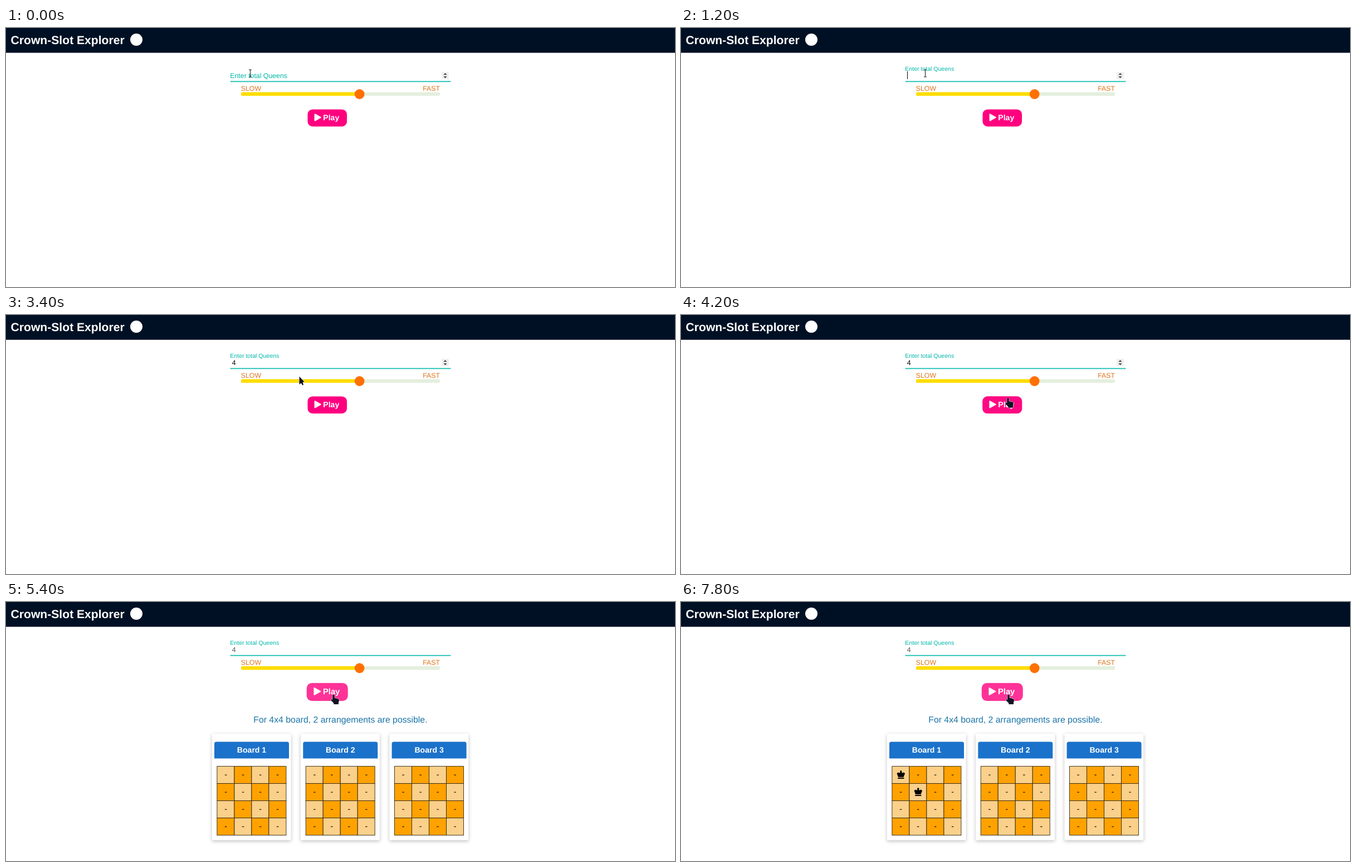
An HTML page for the animation above (8000 ms loop, 1201 by 466 pixels).

```html
<!DOCTYPE html>
<html lang="en">
<head>
<meta charset="utf-8">
<title>Crown-Slot Explorer</title>
<style>
  html, body { margin: 0; width: 100%; height: 100%; overflow: hidden; background: #fff; }
  svg { display: block; width: 100vw; height: 100vh; }
  text { font-family: "Liberation Sans", Arial, sans-serif; text-rendering: geometricPrecision; }
  .bold { font-weight: bold; fill: #fff; }
  .mid { text-anchor: middle; }
  .speed { font-size: 12.32px; fill: #e0741a; }
  .pointer { fill: #0e1424; stroke: #fff; stroke-width: 1; paint-order: stroke; }
  .card { fill: #fff; filter: drop-shadow(0 2px 3px rgba(0, 0, 0, .25)); }
</style>
</head>
<body>
<svg viewBox="0 0 1201 466">
  <defs>
    <path id="queen" d="M0-8.2a1.6 1.6 0 0 1 1.2 2.7L2.4-3.4 4.4-4.8 7.3-3.2 4.8 3.7H-4.8L-7.3-3.2-4.4-4.8-2.4-3.4-1.2-5.5A1.6 1.6 0 0 1 0-8.2ZM-5 4.6H5a.6.6 0 0 1 .6.6V6.6H-5.6V5.2a.6.6 0 0 1 .6-.6Z"/>
  </defs>

  <rect width="1201" height="44.6" fill="#001024"/>
  <text class="bold" x="8.6" y="28.6" font-size="21.12">Crown-Slot Explorer</text>
  <circle cx="234" cy="21" r="11" fill="#fff"/>

  <text id="label" x="402.3" fill="#00b8a9">Enter total Queens</text>
  <text id="value" x="405.7" y="90" font-size="12.32">4</text>
  <rect id="caret" y="78" width="1" height="14"/>
  <g id="spinner">
    <rect x="782" y="79" width="13" height="13.5" fill="#efefef"/>
    <path d="M785.3 84.2 788.5 81 791.7 84.2ZM785.3 87 788.5 90.2 791.7 87Z" fill="#444"/>
  </g>
  <rect x="402.5" y="95.4" width="396" height="1.8" fill="#1bbfb1"/>

  <text class="speed" x="421.8" y="112.6">SLOW</text>
  <text class="speed" x="779" y="112.6" text-anchor="end">FAST</text>
  <rect x="422" y="115.5" width="357" height="6.5" rx="2.6" fill="#e4efdd"/>
  <rect x="422" y="115.5" width="214" height="6.5" rx="2.6" fill="#ffdd00"/>
  <circle cx="634.7" cy="119" r="8.9" fill="#ff7000"/>

  <g id="play">
    <rect id="face" x="541.5" y="146.5" width="70.5" height="30.7" rx="8.8"/>
    <path d="M554.6 155.2V166.6L564.8 160.9Z" fill="#fff" stroke="#fff" stroke-width="2" stroke-linejoin="round"/>
    <text class="bold" x="569.3" y="166" font-size="14.08">Play</text>
  </g>

  <g id="result">
    <text class="mid" x="600.4" y="217.4" font-size="15.84" fill="#1c74a8">For 4x4 board, 2 arrangements are possible.</text>
    <g id="boards"></g>
  </g>

  <path id="beam" d="M-2.5-6.5H-.8Q0-6.5 0-5.7Q0-6.5.8-6.5H2.5M0-5.7V5.7M-2.5 6.5H-.8Q0 6.5 0 5.7Q0 6.5.8 6.5H2.5" fill="none" stroke="#222" stroke-width="1.1"/>
  <path id="arrow" class="pointer" d="M0 0V14.5L3.2 12 5.8 16 7.6 14.8 6 10.6 9 9.8Z"/>
  <path id="hand" class="pointer" d="M-1.8 1.5Q0-1 1.8 1.5V6.3L8 7.6Q10 8.4 10 10.6L9 14.6V17.8H.3V15.6L-4.3 11Q-5.3 9-3.3 8.4L-1.8 9.6Z"/>
</svg>
<script>
const $ = id => document.getElementById(id);
const LIGHT = '#fad08a', DARK = '#ffa200', CLASH = '#fb5607';
const LOOP = 8000, CELL = 31;

function cell(board, row, col) {
  const x = 378.9 + board * 159.3 + col * CELL, y = 295.6 + row * CELL;
  const id = `${board}${row}${col}`;
  return `<rect id="bg${id}" x="${x}" y="${y}" width="${CELL}" height="${CELL}"
      fill="${(row + col) % 2 ? DARK : LIGHT}" stroke="#33260f" stroke-width=".9"/>
    <text id="dash${id}" class="mid" x="${x + 15.6}" y="${y + 19.6}" font-size="14.08">-</text>
    <use id="queen${id}" href="#queen" x="${x + 15.9}" y="${y + 15.8}" visibility="hidden"/>`;
}

function board(n) {
  const x = n * 159.3;
  let cells = '';
  for (let i = 0; i < 16; i++) cells += cell(n, i >> 2, i & 3);
  return `<rect class="card" x="${369.8 + x}" y="237" width="141.8" height="191.4" rx="2"/>
    <path d="M${374 + x} 281.4V255q0-3.5 3.5-3.5h127q3.5 0 3.5 3.5V281.4Z" fill="#1b72ca"/>
    <text class="bold mid" x="${441 + x}" y="271" font-size="14.08">Board ${n + 1}</text>${cells}`;
}
$('boards').innerHTML = [0, 1, 2].map(board).join('');

const clamp = v => Math.min(1, Math.max(0, v));
const ease = v => v * v * (3 - 2 * v);
const mix = (a, b, p) => a + (b - a) * p;
const within = (t, ...spans) => spans.some(([a, b]) => t >= a && t < b);
const show = (id, on) => $(id).setAttribute('visibility', on ? 'visible' : 'hidden');

// time, x, y of the pointer's hot spot
const path = [[2900, 438.5, 81.5], [3000, 441, 80], [3400, 526.5, 110.5],
  [3800, 577, 131], [4200, 587, 149], [4400, 588, 166.3]];

function pointerAt(t) {
  const i = path.findIndex(p => p[0] > t);
  if (i < 0) return path[path.length - 1].slice(1);
  if (!i) return path[0].slice(1);
  const [a, b] = [path[i - 1], path[i]], p = (t - a[0]) / (b[0] - a[0]);
  return [mix(a[1], b[1], p), mix(a[2], b[2], p)];
}

function setQueen(id, on) {
  show('queen' + id, on);
  show('dash' + id, !on);
}

function render(t) {
  const lift = ease(clamp((t - 800) / 400));
  $('label').setAttribute('y', mix(89.8, 76.8, lift));
  $('label').setAttribute('font-size', mix(12.32, 10.56, lift));

  show('value', t >= 2400);
  $('value').setAttribute('fill', t < 5400 ? '#000' : '#555');
  show('caret', within(t, [900, 1900], [2100, 2800], [3500, 4000], [4600, 5200]));
  $('caret').setAttribute('x', t < 2400 ? 406 : 413);
  show('spinner', t < 5200);

  const [x, y] = pointerAt(t);
  const kind = y < 97 ? 'beam' : y < 146 ? 'arrow' : 'hand';
  for (const id of ['beam', 'arrow', 'hand']) show(id, id === kind);
  $(kind).setAttribute('transform', `translate(${x} ${y})`);

  const hover = ease(clamp((t - 4130) / 270));
  $('play').setAttribute('transform',
    `translate(576.8 161.9) scale(${1 + .05 * hover}) translate(-576.8 -161.9)`);
  $('face').setAttribute('fill', `rgb(255 ${51 * hover} ${mix(127, 151, hover)})`);

  $('result').setAttribute('display', t < 5400 ? 'none' : 'inline');
  if (t < 5400) return;
  setQueen('000', t >= 5800);
  setQueen('010', within(t, [7000, 7400]));
  setQueen('011', t >= 7800);
  $('bg000').setAttribute('fill', within(t, [7400, 7800]) ? CLASH : LIGHT);
}

const start = performance.now();
function tick() {
  const t = (performance.now() - start) % LOOP;
  render(Math.floor(t / 100) * 100);
  requestAnimationFrame(tick);
}
tick();
</script>
</body>
</html>
```
